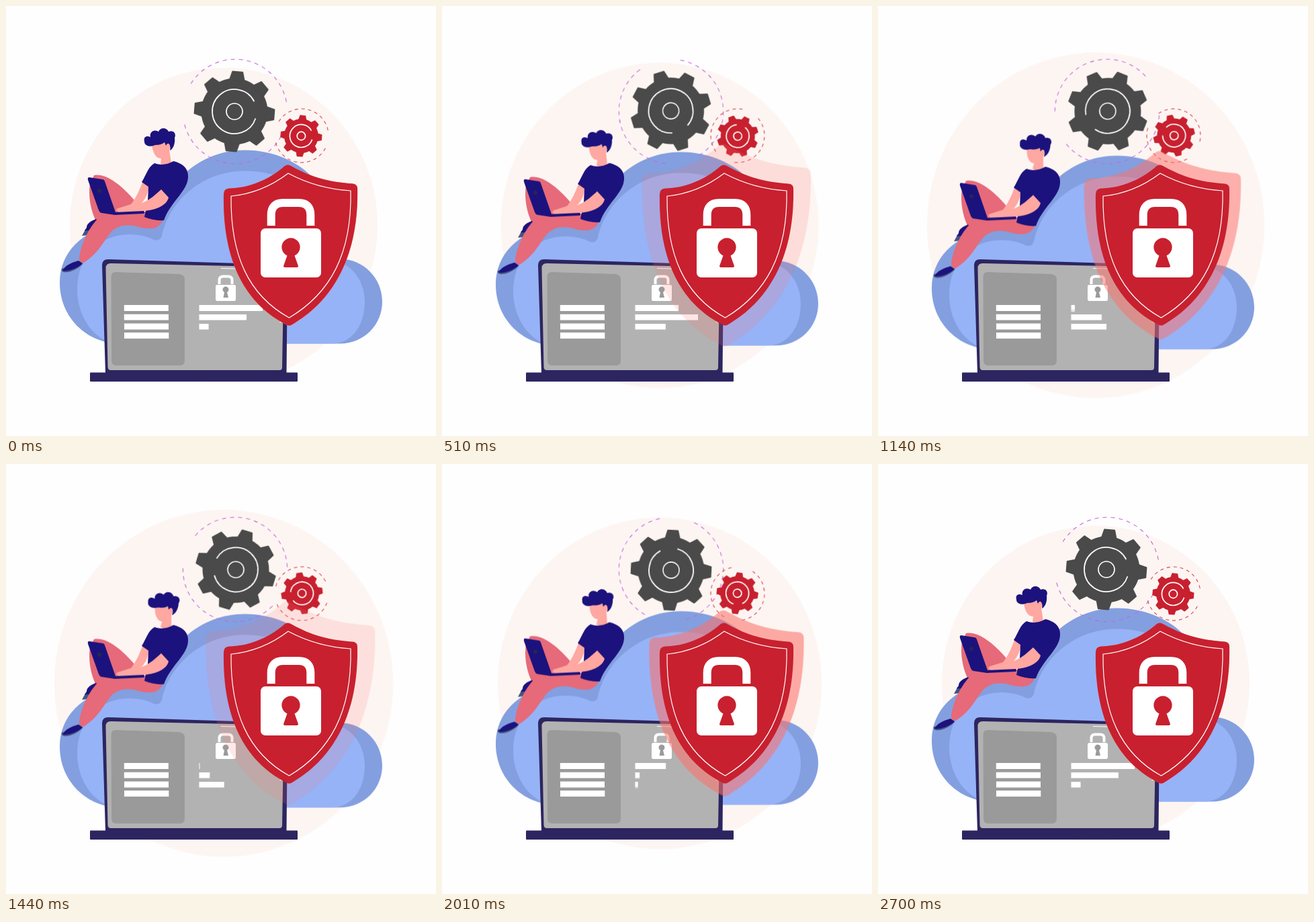
Write an HTML page without scripts that moves like this. It is 640 by 640 pixels and loops after 2.73 s.

```html
<!DOCTYPE html>
<html lang="en">
<head>
<meta charset="utf-8">
<title>Cloud security</title>
<style>
  html, body { margin: 0; width: 100%; height: 100%; overflow: hidden; background: #fefefe; }
  svg { display: block; width: 100vw; height: 100vh; }

  .backdrop, .float, .head, .spin, .pulse, .bar { animation: 2730ms linear infinite; }
  .backdrop { transform-origin: 324px 326.5px; animation-name: swell; }
  .float { animation-name: float; }
  .head { transform-origin: 238px 235px; animation-name: nod; }
  .spin { animation-name: spin; }
  .back { animation-direction: normal; animation-name: spin-back; }
  .pulse { transform-origin: 424px 356px; animation-name: grow, fade; }
  .bar { transform-origin: 287.5px 0; fill: #fff; }
  .bar1 { animation-name: bar1; }
  .bar2 { animation-name: bar2; }
  .bar3 { animation-name: bar3; }
  .backdrop, .float, .head, .bar { animation-timing-function: cubic-bezier(.364, 0, .636, 1); }

  /* Every cycle runs 2700 ms and rests for 30 ms (98.901%). */
  @keyframes swell { 0%, 98.901%, 100% { transform: none } 49.451% { transform: scale(1.1025) } }
  @keyframes float { 0%, 98.901%, 100% { transform: none } 49.451% { transform: translateY(8.8px) } }
  @keyframes nod { 0%, 98.901%, 100% { transform: none } 49.451% { transform: rotate(9deg) } }
  @keyframes spin { 0% { transform: none } 98.901%, 100% { transform: rotate(360deg) } }
  @keyframes spin-back { 0% { transform: none } 98.901%, 100% { transform: rotate(-360deg) } }
  @keyframes grow {
    0%, 32.968%, 65.935% { transform: none; animation-timing-function: cubic-bezier(.333, 1, .667, 1) }
    32.967%, 65.934%, 98.9% { transform: scale(1.283) }
    98.901%, 100% { transform: none }
  }
  @keyframes fade {
    0%, 32.968%, 65.935% { opacity: 1; animation-timing-function: cubic-bezier(.333, .667, .667, 1) }
    32.967%, 65.934%, 98.9% { opacity: 0 }
    98.901%, 100% { opacity: 1 }
  }
  @keyframes bar1 { 0%, 98.901%, 100% { transform: none } 49.451% { transform: scaleX(0) } }
  @keyframes bar2 {
    0% { transform: scaleX(.75); animation-timing-function: cubic-bezier(.333, .605, .667, 1) }
    16.484% { transform: none }
    65.934% { transform: scaleX(.004); animation-timing-function: cubic-bezier(.333, 0, .667, .597) }
    98.901%, 100% { transform: scaleX(.75) }
  }
  @keyframes bar3 {
    0% { transform: scaleX(.25); animation-timing-function: cubic-bezier(.333, .403, .667, 1) }
    32.967% { transform: none }
    82.418% { transform: scaleX(0); animation-timing-function: cubic-bezier(.333, 0, .667, .395) }
    98.901%, 100% { transform: scaleX(.25) }
  }

  .navy { fill: #1c127d; }
  .skin { fill: #ffa7a1; }
  .pink { fill: #e66a79; }
  .sole { fill: #435384; }
  .line { fill: none; stroke: #fff; }
  .orbit { fill: none; stroke-width: 1.1; stroke-dasharray: 6 6; }
</style>
</head>
<body>
<svg viewBox="0 0 640 640">
  <defs>
    <path id="tooth" d="M-11 -46 L-7.5 -59 H7.5 L11 -46Z" stroke="currentColor" stroke-width="2" stroke-linejoin="round"/>
    <g id="quarter">
      <use href="#tooth"/>
      <use href="#tooth" transform="rotate(45)"/>
    </g>
    <g id="gear">
      <g fill="currentColor" transform="rotate(4.5)">
        <circle r="49.5"/>
        <use href="#quarter"/>
        <use href="#quarter" transform="rotate(90)"/>
        <use href="#quarter" transform="rotate(180)"/>
        <use href="#quarter" transform="rotate(270)"/>
      </g>
      <g class="line" stroke-width="1.7">
        <circle r="12" vector-effect="non-scaling-stroke"/>
        <path d="M31.4 10.2 A33 33 0 1 1 29.4 -15" vector-effect="non-scaling-stroke"/>
      </g>
    </g>
    <path id="shield" d="M415 238 C390 260 360 271 332 271.500 Q324 272 324 280 C322 385 360 445 417 474 Q421 477 426 474 C485 440 525 375 523 272 Q523 265 516 264.500 C480 262 455 255 426 239 Q420 234.500 415 238Z"/>
  </defs>

  <ellipse class="backdrop" cx="324" cy="326.500" rx="229" ry="234.500" fill="#fdf5f2"/>

  <g class="float">
    <path fill="#839fdf" d="M170 502.500 C120 502.500 80 463 80 412 C80 368 112 333 165 326 L232 318 C236 262 290 214.500 355 214.500 C400 214.500 440 233 465 265 L485 378 L497 376.500 C532 376.500 560 405 560 440 C560 475 532 502.500 497 502.500Z"/>
    <path fill="#96b3f8" d="M170 502.500 C133 502.500 106 463 106 422 C106 374 138 340 184 340 C200 340 212 344 220 348 Q229 351 232 342 C244 287 295 245.500 355 245.500 C400 245.500 440 262 460 300 L480 378 C515 380 534 410 534 440 C534 475 515 502.500 485 502.500Z"/>
  </g>

  <g transform="translate(341 157)">
    <g class="spin">
      <g class="orbit" stroke="#c566dd">
        <path id="arc" d="M-65.900 -41.200 A77.700 77.700 0 0 1 77.100 -9.500"/>
        <use href="#arc" transform="rotate(176)"/>
      </g>
      <use href="#gear" x="-1" color="#4a4a4a"/>
    </g>
  </g>
  <g transform="translate(440 193)">
    <g class="spin back">
      <g class="orbit" stroke="#d9434e" style="stroke-dasharray: 5 5">
        <path id="small-arc" d="M-33.900 -21.200 A40 40 0 0 1 39.700 -4.900"/>
        <use href="#small-arc" transform="rotate(176)"/>
      </g>
      <use href="#gear" transform="translate(-.6 .4) scale(.515)" color="#c8202f"/>
    </g>
  </g>

  <g class="float">
    <path class="pink" d="M131 252 C152 248 180 274 198 298 L164 308 L134 320 C126 304 122 282 125 264Z"/>
    <path class="sole" d="M118 333 L113 342 L124 341 L130 331Z"/>
    <path class="navy" d="M134 317 C126 320 120 324 120 330 L117 334 Q126 335 130 331 L137 320Z"/>
    <path class="skin" d="M204 260 L213 268 C211 281 206 292 194 300 L172 306 L164 302 L186 295 C194 285 199 273 204 260Z"/>
    <path class="pink" d="M234 317 C228 334 212 333 196 328.500 C178 323 163 328 155 338 C143 354 137 368 116 382 C109 382 109 378 109 374 C112 355 122 330 140 313 C160 305 190 310 208 306Z"/>
    <path class="sole" d="M83 391 C80 401 104 396 115 383Z"/>
    <path class="navy" d="M108 379 C97 382 88 386 84 394 C92 395 106 391 114 383Z"/>
    <g class="head">
      <path class="skin" d="M217 206 C218 218 223 227 231 227 L230 235 Q238 241 246 234 L243 214 C248 204 240 200 236 204Z"/>
      <path class="navy" d="M206 202 C204 194 210 193 215 195 C213 187 221 183 227 187 C230 180 239 181 242 187 C249 184 254 190 251 196 C252 202 250 212 244 215 C246 206 241 201 238 208 L236 203 C230 208 222 206 219 208 C212 210 206 207 206 202Z"/>
    </g>
    <path class="navy" d="M221 234 Q235 239 249 231 C263 234 272 242 271 255 C270 276 245 291 235 319 Q220 320 206 314 L211 290 L212 269 L202 262 C209 251 211 240 221 234Z"/>
    <path class="skin" d="M231 273 L242 285 C239 297 224 303 207 305 L171 308 L163 304 L178 299 L203 293 C215 288 222 281 231 273Z"/>
    <path class="navy" d="M124 255 L143 258 Q146 258 147 261 L163 307 L205 305 Q207 307 205 309 L162 311 L142 308 Q139 307 138 304 L122 259 Q121 255 124 255Z"/>
    <circle cx="139" cy="275" r="3" fill="#292650"/>
  </g>

  <g>
    <path fill="#2d2560" d="M152 377 L412 385 Q420 386 419 394 L417.500 546 H148 L143 386 Q143 377 152 377Z"/>
    <path fill="#b3b2b2" d="M156 383 L406 388.500 Q414 389 413.500 396 L411 538 Q411 542 407 542 H156 Q151.500 542 151.500 537 L148.500 391 Q148 383 156 383Z"/>
    <path fill="#9b9a9a" d="M163 396 L258 399 Q266 400 266 407 V528 Q266 535 259 535 H164 Q157 535 157 528 L156.500 403 Q156.500 396 163 396Z"/>
    <rect x="125" y="545.500" width="309" height="13.500" rx="1" fill="#2d2560"/>
    <path d="M175.800 449.500 H241.800 M175.800 463.200 H242 M176 477 H242 M176 490.500 H242.300" class="line" stroke-width="8.800"/>
    <rect class="bar bar1" x="287.500" y="445" width="94.500" height="9"/>
    <rect class="bar bar2" x="287.500" y="459" width="94" height="8.500"/>
    <rect class="bar bar3" x="287.500" y="473" width="57" height="8.500"/>
    <path class="line" d="M320 390.500 L342 391 M407.500 470.500 H410"/>
    <path class="line" stroke-width="4" d="M317.500 414 V408 Q317.500 402.500 323 402.500 H331 Q336.500 402.500 336.500 408 V414"/>
    <rect x="312" y="415" width="30" height="24" rx="2.500" fill="#fff"/>
    <path fill="#9b9a9a" d="M325 426 A4.500 4.500 0 1 1 329 426 L331 434 H323.500Z"/>
  </g>

  <use class="pulse" href="#shield" fill="#fc736d"/>
  <use href="#shield" fill="#c8202f"/>
  <path class="line" stroke-width="1.200" d="M420 249 C395 268 365 280 335 283 C334 370 360 430 421.500 464 C482 428 515 370 513 275 C480 273 450 265 420 249Z"/>
  <path class="line" stroke-width="12" d="M394.700 327 V311 C394.700 299 401 293 412 293 H436 C447 293 453.300 299 453.300 311 V327"/>
  <rect x="379" y="331" width="90" height="73" rx="7" fill="#fff"/>
  <path fill="#c8202f" d="M418.500 371.500 A13.700 13.700 0 1 1 429.500 371.500 L435 387 Q435 389 433 389 H415 Q413 389 413 387Z"/>
</svg>
</body>
</html>
```
